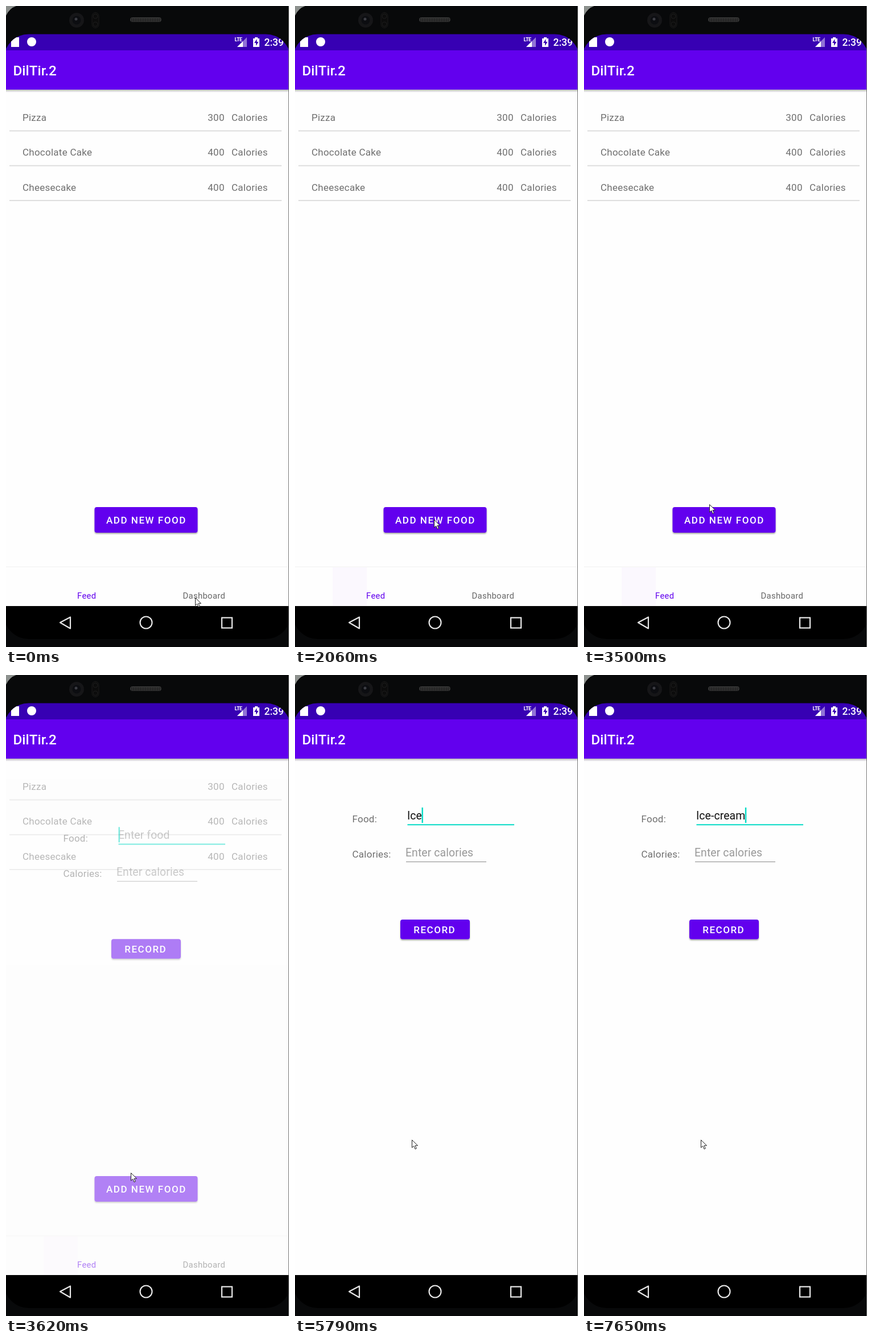
Write an HTML page that moves like this. It is 497 by 1127 pixels and loops after 8000 ms.

```html
<!DOCTYPE html>
<html lang="en">
<head>
<meta charset="utf-8">
<title>Food log</title>
<style>
  html, body { margin: 0; width: 100%; height: 100%; overflow: hidden; background: #08090a; }
  svg { display: block; width: 497px; height: 1127px; font-family: Roboto, sans-serif; }
  text { white-space: pre; }
  .body { font-size: 17px; letter-spacing: .25px; fill: #6f6f6f; }
  .big { font-size: 34px; letter-spacing: .3px; fill: #000; }
  .input { font-size: 19.4px; letter-spacing: .1px; fill: #999; }
  .button { font-size: 17px; font-weight: 500; letter-spacing: 1.52px; fill: #fff; }
  .tab { font-size: 14.8px; letter-spacing: .35px; fill: #666; }
  .tab.on { fill: #6200ee; }
</style>
</head>
<body>
<svg viewBox="0 0 497 1127">
  <defs>
    <clipPath id="screen"><rect x="-4" y="49.500" width="504" height="1063.500" rx="44"/></clipPath>
    <clipPath id="page"><rect y="147" width="497" height="908"/></clipPath>
    <clipPath id="tabs"><rect y="987" width="497" height="68"/></clipPath>
    <clipPath id="addShape"><rect x="155.500" y="881" width="181" height="45" rx="4"/></clipPath>
    <linearGradient id="shade" x2="0" y2="1">
      <stop stop-color="#000" stop-opacity=".28"/><stop offset="1" stop-color="#000" stop-opacity="0"/>
    </linearGradient>
    <pattern id="mesh" width="3" height="3" patternUnits="userSpaceOnUse">
      <rect width="3" height="3" fill="#161616"/><path d="M0 .5H3M.5 0V3" stroke="#3a3a3a"/>
    </pattern>
    <filter id="lift" x="-10%" y="-20%" width="120%" height="160%">
      <feDropShadow dx="0" dy="2" stdDeviation="1" flood-opacity=".35"/>
    </filter>
  </defs>

  <!-- phone body -->
  <rect width="497" height="1127" fill="#08090a"/>
  <path d="M0 0H18Q6 4 0 17Z" fill="#8d918e"/>
  <circle cx="124" cy="25" r="13" fill="#161618"/>
  <circle cx="124" cy="25" r="7.500" fill="#0c0d11"/>
  <circle cx="123" cy="23" r="2.500" fill="#3c3d44"/>
  <rect x="151" y="11.500" width="12" height="27" rx="6" fill="#0c0c0c" stroke="#1a1a1a"/>
  <circle cx="157" cy="18" r="4" fill="none" stroke="#1d1d1d"/>
  <circle cx="157" cy="32" r="4" fill="none" stroke="#1d1d1d"/>
  <rect x="218.500" y="20.500" width="54" height="7" rx="3" fill="url(#mesh)" stroke="#383838"/>

  <g clip-path="url(#screen)">
    <rect y="49" width="497" height="1064"/>
    <rect y="147" width="497" height="908" fill="#fefefe"/>
    <g clip-path="url(#page)">
      <g id="main">
        <g id="feed"></g>
        <g id="dashboard"></g>
        <g id="add"></g>
        <path d="M0 986H497" stroke="#f0f0f0"/>
        <g clip-path="url(#tabs)">
          <rect id="residue" x="66" y="986" width="60" height="68" fill="#fbf8fe"/>
          <circle id="ripple" cy="1020" fill="#6200ee"/>
        </g>
        <text id="feedTab" class="tab" x="125" y="1042">Feed</text>
        <text id="dashTab" class="tab" x="310.500" y="1042">Dashboard</text>
      </g>
      <g id="entry">
        <rect y="147" width="497" height="908" fill="#fefefe"/>
        <path d="M197.500 263.200H385" stroke="#03dac5" stroke-width="2"/>
        <path d="M195 328.500H336" stroke="#888"/>
        <text id="food" class="input" x="197" y="254"></text>
        <rect id="caret" y="233" width="2.400" height="27" fill="#03dac5"/>
      </g>
    </g>
    <rect y="147" width="497" height="5" fill="url(#shade)"/>
    <rect y="49" width="497" height="29" fill="#3700b3"/>
    <rect y="78" width="497" height="69" fill="#6200ee"/>
    <text x="12.500" y="121.500" font-size="24.300" font-weight="500" fill="#fff">DilTir.2</text>

    <!-- status icons -->
    <g fill="#fff">
      <path d="M9 60L14 55H23V72H9Z"/>
      <circle cx="45" cy="63" r="8"/>
      <text x="401.500" y="62" font-size="9" font-weight="700" letter-spacing="-.5">LTE</text>
      <path d="M423 55V72H406Z" opacity=".45"/>
      <path d="M416 62V72H406Z"/>
      <path d="M434 57H437V55H442V57H445V72H434Z"/>
      <path d="M440.500 58L436 65H439V70L443.500 63H440.500Z" fill="#3700b3"/>
      <text x="453.500" y="70" font-size="17.500" font-weight="500">2:39</text>
    </g>

    <!-- system navigation -->
    <g fill="none" stroke="#e8e8e8" stroke-width="2.200">
      <path d="M95 1084L113 1074.500V1094.500Z" stroke-linejoin="round"/>
      <circle cx="246" cy="1084" r="10.500"/>
      <rect x="379" y="1075.500" width="18" height="18"/>
    </g>
  </g>
  <path d="M496.500 0V1127" stroke="#777"/>
  <path id="pointer" d="M.5 .5V14L3.700 11L6 16.500L8.300 15.500L6 10.300H10.500Z" fill="#fff" stroke="#222"/>
</svg>
<script>
const $ = id => document.getElementById(id);
const add = (id, markup) => $(id).insertAdjacentHTML('beforeend', markup);
const label = (kind, x, y, words) => `<text class="${kind}" x="${x}" y="${y}">${words}</text>`;
const button = (x, y, w, h, tx, ty, words) =>
  `<rect x="${x}" y="${y}" width="${w}" height="${h}" rx="4" fill="#6200ee" filter="url(#lift)"/>` +
  label('button', tx, ty, words);

[['Pizza', 300], ['Chocolate Cake', 400], ['Cheesecake', 400]].forEach(([name, amount], i) => {
  const y = 202 + i * 61.3;
  add('feed', label('body', 29, y, name) + label('body', 354.3, y, amount) + label('body', 396, y, 'Calories') +
    `<path d="M6 ${y + 17.5}H484" stroke="#dedede" stroke-width="2"/>`);
});
add('dashboard',
  label('big', 30.5, 262, 'Average Amount:') + label('big', 361.8, 262, 366) +
  label('big', 30, 340, 'Minimum Amount:') + label('big', 370.7, 340, 300) +
  label('big', 27.5, 419, 'Maximum Amount:') + label('big', 371.2, 420, 400) +
  button(293.5, 461, 154, 44, 314, 489.5, 'CLEAR DATA'));
add('add', button(155.5, 881, 181, 45, 176, 910, 'ADD NEW FOOD') +
  '<circle id="press" cx="244" cy="903" fill="#fff" clip-path="url(#addShape)"/>');
add('entry', label('body', 100.5, 258.5, 'Food:') + label('body', 100.5, 320.5, 'Calories:') +
  label('input', 194, 319, 'Enter calories') + button(185, 430, 122, 34.5, 208.3, 454, 'RECORD'));

const LOOP = 8000;
const WORD = 'Ice-cream';
const KEYS = [5380, 5590, 5790, 6070, 6370, 6520, 6820, 7510, 7650];
// start, end and number of picture changes of each stepped passage
const PASSAGES = [[150, 1090, 8], [1390, 2060, 6], [2900, 3500, 5], [3500, 3620, 2], [3620, 3920, 3]];
// time, x, y
const PATH = [[0, 332, 1040], [550, 332, 1040], [820, 250, 1045], [1090, 176, 1042], [1650, 176, 1042],
  [2060, 244, 903], [3200, 244, 903], [3500, 220, 876], [3920, 218, 871], [4079, 218, 871], [4080, 205, 817]];

const within = (t, a, b) => t >= a && t < b;
const ramp = (t, a, b) => Math.min(1, Math.max(0, (t - a) / (b - a)));
const show = (id, on) => $(id).setAttribute('visibility', on ? 'inherit' : 'hidden');
const set = (id, values) => { for (const k in values) $(id).setAttribute(k, values[k]); };

function hold(t) {
  for (const [start, end, count] of PASSAGES) {
    if (!within(t, start, end)) continue;
    const gap = (end - start) / (count - 1);
    return start + Math.floor((t - start) / gap + 1e-6) * gap;
  }
  return t;
}

function pointerAt(t) {
  const next = PATH.findIndex(p => p[0] > t);
  if (next < 0) return PATH[PATH.length - 1].slice(1);
  const a = PATH[next - 1], b = PATH[next], k = ramp(t, a[0], b[0]);
  return [a[1] + (b[1] - a[1]) * k, a[2] + (b[2] - a[2]) * k];
}

function draw(time) {
  const t = hold(time);
  const onDash = within(t, 280, 1520);
  show('feed', !onDash);
  show('dashboard', onDash);
  $('feedTab').classList.toggle('on', !onDash);
  $('dashTab').classList.toggle('on', onDash);

  const tap = t < 1390 ? 150 : 1390;
  set('ripple', {
    cx: tap === 150 ? 348 : 142,
    r: 20 + 57 * ramp(t, tap, tap + 270),
    opacity: t < tap ? 0 : .12 * (1 - ramp(t, tap + 270, tap + 600))
  });
  show('residue', t >= 1990);
  set('press', {
    r: 15 + 95 * ramp(t, 2900, 3200),
    opacity: t < 2900 ? 0 : .24 * (1 - ramp(t, 3200, 3500))
  });

  const opened = ramp(t, 3500, 3900), ease = 1 - (1 - opened) ** 2;
  show('entry', opened > 0);
  set('entry', { opacity: ease, transform: `translate(0 ${70 * (1 - ease)})` });

  const typed = KEYS.filter(k => k <= t).length;
  const food = $('food');
  food.textContent = typed ? WORD.slice(0, typed) : 'Enter food';
  food.style.fill = typed ? '#111' : '';
  set('caret', { x: typed ? 196.5 + food.getComputedTextLength() : 197.5 });
  show('caret', opened > 0 && !within(t, 4080, 4580) && !within(t, 4980, 5380) && !within(t, 7380, 7510));

  set('pointer', { transform: `translate(${pointerAt(t).map(Math.round)})` });
}

const start = performance.now();
function tick() {
  draw((performance.now() - start) % LOOP);
  requestAnimationFrame(tick);
}
tick();
</script>
</body>
</html>
```
